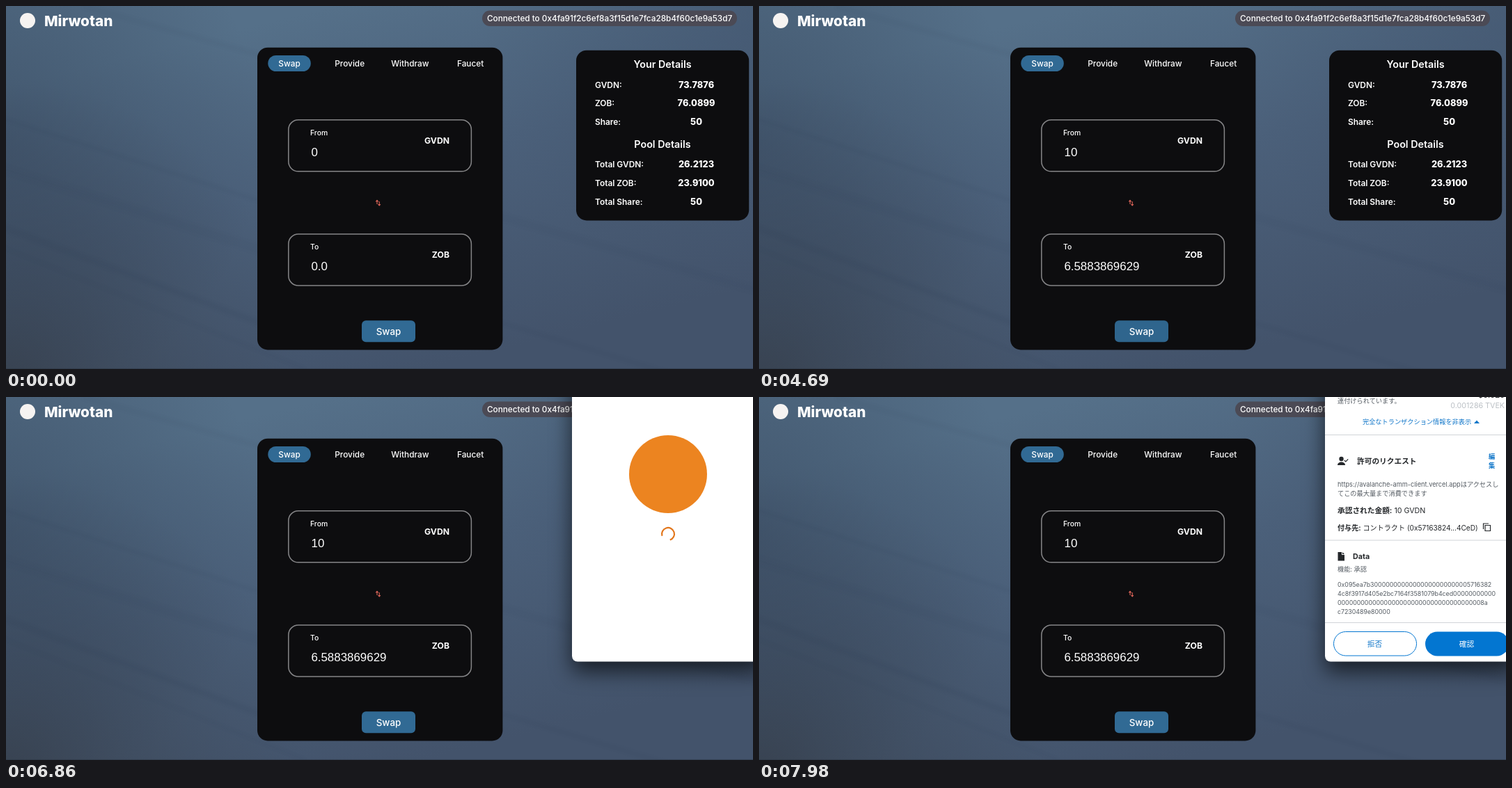
An HTML page for the animation above (8 s loop, 1073 by 522 pixels).

```html
<!DOCTYPE html>
<html lang="en">
<head>
<meta charset="utf-8">
<title>Token swap</title>
<style>
  html, body { margin: 0; width: 100%; height: 100%; overflow: hidden; background: #4a5e78; }
  svg { display: block; width: 100vw; height: 100vh; }
  text { font-family: Inter, "Noto Sans CJK JP", "Noto Sans CJK", sans-serif; fill: #fff; white-space: pre; }
  .m { text-anchor: middle; }
  .e { text-anchor: end; }
  .tab { font-size: 11.8px; font-weight: 500; }
  .label { font-size: 10.4px; font-weight: 500; }
  .token { font-size: 12.2px; font-weight: 700; }
  .num { font-family: "Liberation Sans", Arial, sans-serif; font-size: 16.9px; }
  .head { font-size: 14.3px; font-weight: 600; }
  .row { font-size: 11.9px; font-weight: 600; }
  .val { font-size: 12.8px; font-weight: 800; }
  .streaks path { fill: none; stroke: #24344c; filter: blur(2px); }
  #shadow { filter: drop-shadow(0 14px 15px rgba(0, 0, 0, .65)); }
  #page text { fill: #535a61; font-size: 10.7px; }
  #page .s { font-size: 9.2px; }
  #page .hex { font-size: 8.8px; }
  #page .b { font-weight: 700; fill: #24272a; }
  #page .k { fill: #24272a; }
  #page .link { fill: #1076c9; }
  #page .title { font-size: 18.4px; fill: #24272a; }
  .rule { stroke: #d0d4d8; stroke-width: 1; }
  .icon { fill: none; stroke: #24272a; stroke-width: 1.2; }
</style>
</head>
<body>
<svg viewBox="0 0 1073 522" preserveAspectRatio="none">
  <defs>
    <linearGradient id="sky" gradientUnits="userSpaceOnUse" x1="470" y1="0" x2="600" y2="522">
      <stop offset="0" stop-color="#557089"/>
      <stop offset=".45" stop-color="#4b607a"/>
      <stop offset="1" stop-color="#43536b"/>
    </linearGradient>
    <radialGradient id="dim" gradientUnits="userSpaceOnUse" cx="0" cy="540" r="430">
      <stop offset="0" stop-color="#353d48" stop-opacity=".8"/>
      <stop offset="1" stop-color="#3c4858" stop-opacity="0"/>
    </radialGradient>
    <radialGradient id="dimLeft" gradientUnits="userSpaceOnUse" cx="-20" cy="190" r="390">
      <stop offset="0" stop-color="#2f3d52" stop-opacity=".5"/>
      <stop offset="1" stop-color="#2f3d52" stop-opacity="0"/>
    </radialGradient>
    <radialGradient id="dimRight" gradientUnits="userSpaceOnUse" cx="1090" cy="0" r="420">
      <stop offset="0" stop-color="#3d4f68" stop-opacity=".45"/>
      <stop offset="1" stop-color="#3d4f68" stop-opacity="0"/>
    </radialGradient>
    <clipPath id="frame"><rect x="813" y="-94" width="276" height="474.5" rx="8"/></clipPath>
    <clipPath id="disc"><circle cx="900.5" cy="266.5" r="8.3"/></clipPath>
  </defs>

  <rect width="1073" height="522" fill="url(#sky)"/>
  <rect width="1073" height="522" fill="url(#dim)"/>
  <rect width="1073" height="522" fill="url(#dimLeft)"/>
  <rect width="1073" height="522" fill="url(#dimRight)"/>
  <g class="streaks">
    <path d="M-10 160L370 282" stroke-width="5" opacity=".06"/>
    <path d="M-10 232L370 352" stroke-width="14" opacity=".04"/>
    <path d="M-10 316L370 458" stroke-width="9" opacity=".08"/>
    <path d="M-10 345L430 522" stroke-width="4" opacity=".06"/>
    <path d="M110 0L370 72" stroke-width="8" opacity=".04"/>
    <path d="M700 300L1083 410" stroke-width="12" opacity=".04"/>
    <path d="M700 452L960 530" stroke-width="6" opacity=".07"/>
  </g>
  <path d="M0 521.5H1073" stroke="#2d3745" opacity=".6"/>

  <circle cx="31" cy="21" r="11" fill="#f6f3f1"/>
  <text x="55" y="29" font-size="20.8" font-weight="800">Mirwotan</text>
  <rect x="684" y="6.5" width="366" height="22.5" rx="11.2" fill="#4b4a55"/>
  <text x="691" y="22.2" font-size="11.75" font-weight="500">Connected to 0x4fa91f2c6ef8a3f15d1e7fca28b4f60c1e9a53d7</text>

  <rect x="361" y="59.7" width="352.4" height="434.7" rx="15" fill="#0d0d0f"/>
  <rect x="376.3" y="71" width="61.5" height="23" rx="11.5" fill="#316a94"/>
  <g id="tabs"></g>
  <g fill="none" stroke="#858587" stroke-width="1.5">
    <rect x="405.8" y="163.8" width="262.6" height="74" rx="14"/>
    <rect x="405.8" y="328" width="262.6" height="74" rx="14"/>
  </g>
  <text class="label" x="437" y="185.7">From</text>
  <text class="label" x="437" y="349.7">To</text>
  <text class="token e" x="637" y="198">GVDN</text>
  <text class="token e" x="637" y="362">ZOB</text>
  <text class="num" id="from" x="438.6" y="216"></text>
  <text class="num" id="to" x="438.4" y="380"></text>
  <g id="stepper">
    <rect x="540" y="200" width="11.5" height="20" fill="#4c4c4e"/>
    <path d="M543 207.6L545.7 204.4L548.4 207.6ZM543 212.8L545.7 216L548.4 212.8Z" fill="#f2f2f2"/>
  </g>
  <rect id="caret" y="201" width="1" height="18.5" fill="#fff"/>
  <path d="M533 285V279.5M531.3 281.3L533 279.3L534.7 281.3M536.2 281V286.7M534.5 285L536.2 287L537.9 285" fill="none" stroke="#df665a" stroke-width="1.1"/>
  <rect id="button" x="511" y="452.2" width="77" height="31" rx="6"/>
  <text class="m" x="549.5" y="473" font-size="13.4" font-weight="500">Swap</text>

  <rect x="819" y="63.7" width="248.2" height="244.7" rx="15" fill="#0d0d0f"/>
  <text class="head m" x="943" y="88.8">Your Details</text>
  <text class="head m" x="943" y="203.5">Pool Details</text>
  <g id="details"></g>

  <g id="popup">
    <rect id="shadow" x="813" y="-94" width="276" height="474.5" rx="8" fill="#fff"/>
    <g clip-path="url(#frame)">
      <g id="loading">
        <circle cx="951" cy="111" r="56" fill="#ec8420"/>
        <path id="ring" d="M951 188A9 9 0 1 1 942 197" fill="none" stroke="#e2761b" stroke-width="2.2"/>
      </g>
      <g id="page">
        <rect x="825.5" y="-50" width="252" height="120" rx="6" fill="#eaf2fb" stroke="#4b92cf"/>
        <text class="s k" x="863" y="9">ガス代の見積もりとカスタマイズが新しくなり</text>
        <text class="s k" x="863" y="22">ました。</text>
        <text class="s b link" x="863" y="41">設定で、改善されたガス代 UI をオンにしてくだ</text>
        <text class="s b link" x="863" y="54">さい</text>

        <rect x="861.5" y="95.5" width="178" height="38" rx="19" fill="#fff" stroke="#bbc0c5"/>
        <circle cx="883" cy="114" r="12" fill="#e2761b"/>
        <circle cx="901" cy="107" r="9.2" fill="#f2f3f4" stroke="#d6d9dc"/>
        <text class="m" x="901" y="111">A</text>
        <text x="914" y="111">avalanche-amm-</text>
        <text x="914" y="126">client.vercel.app</text>
        <text class="title m" x="950.5" y="170">GVDNへのアクセス権限を与</text>
        <text class="title m" x="950.5" y="195">えますか？</text>
        <text class="m" x="950" y="225">パーミッションを付与することで、次のコントラ</text>
        <text class="m" x="950" y="240">クトによる資金へのアクセスが許可されます</text>

        <rect x="881" y="256" width="139" height="21" rx="10.5" fill="#f2f3f4"/>
        <g clip-path="url(#disc)">
          <rect x="892" y="258" width="17" height="17" fill="#f39a2b"/>
          <path d="M900 257L910 257V268L899 265Z" fill="#2a86d8"/>
          <path d="M890 266L901 269L907 276H890Z" fill="#17496e"/>
        </g>
        <text x="914" y="270" style="font-size:10.3px">0x5716...4ced</text>
        <g class="icon">
          <path d="M991 265H995.5V269.5H991ZM989.3 267.5V263.2H993.6"/>
          <path d="M1006 263H1002.5V270H1009.5V268M1004.8 267.6C1005 265 1006.5 264.3 1009.5 264.3M1008 262L1010.6 264.3L1008 266.6"/>
        </g>
        <text class="link m" x="950.5" y="299.3" style="font-size:11.1px">アクセス許可の編集</text>
        <path class="rule" d="M813 327.5H1089"/>

        <path d="M831 359H837L843.5 365.3L837.8 371L831 364.5Z" fill="#24272a"/>
        <circle cx="833.6" cy="361.6" r="1.1" fill="#fff"/>
        <text class="b" x="856" y="368">トランザクション手数料</text>
        <text class="s b link" x="1048" y="361.3">編</text>
        <text class="s b link" x="1048" y="374.3">集</text>

        <g transform="translate(0 405)">
          <text class="s" x="831" y="-5">手数料はこのリクエストに関</text>
          <text class="s" x="831" y="8.5">連付けられています。</text>
          <text class="b e" x="1071" y="1">$0.026</text>
          <text class="e" x="1071" y="16" style="fill:#bbc0c5">0.001286 TVEK</text>
          <text class="s link" x="867" y="38.7">完全なトランザクション情報を非表示</text>
          <path d="M1027 38L1031 33.5L1035 38Z" fill="#1076c9"/>
          <path class="rule" d="M813 54.5H1089"/>

          <circle cx="836.5" cy="89" r="3.2" fill="#24272a"/>
          <path d="M831 98C831 92 842 92 842 98Z" fill="#24272a"/>
          <path class="icon" d="M840.8 91L842.8 93L846.2 89.3"/>
          <text class="b" x="859" y="96">許可のリクエスト</text>
          <text class="s b link" x="1048" y="89.3">編</text>
          <text class="s b link" x="1048" y="102.3">集</text>
          <text class="s" x="831" y="128.5">https://avalanche-amm-client.vercel.appはアクセスし</text>
          <text class="s" x="831" y="141.5">てこの最大量まで消費できます</text>
          <text class="k" x="831" y="167"><tspan class="b">承認された金額:</tspan> 10 GVDN</text>
          <text class="k" x="831" y="192" style="font-size:10.1px"><tspan class="b">付与先:</tspan> コントラクト (0x57163824...4CeD)</text>
          <path class="icon" d="M1043 184.5H1050.5V192.5H1043ZM1040.5 190V182H1048"/>
          <path class="rule" d="M813 206H1089"/>

          <path d="M831.5 223H837V227H841V235.5H831.5ZM838 223L841 226H838Z" fill="#24272a"/>
          <text class="b" x="853" y="233">Data</text>
          <text class="s" x="831" y="251">機能: 承認</text>
          <g id="hex"></g>
          <path class="rule" d="M813 324.5H1089"/>
          <rect x="825.5" y="337.5" width="119" height="34.5" rx="17.2" fill="#fff" stroke="#0376d1"/>
          <text class="link m" x="884.5" y="358.5">拒否</text>
          <rect x="957" y="337.5" width="120" height="35" rx="17.5" fill="#0376d1"/>
          <text class="m" x="1016.5" y="358.5" style="fill:#fff;font-weight:500">確認</text>
        </g>
      </g>
      <rect x="813" y="-94" width="276" height="22" fill="#46474c"/>
      <circle cx="824" cy="-83" r="4.6" fill="#ec6a5e"/>
      <circle cx="839.4" cy="-83" r="4.6" fill="#f4bf4f"/>
      <circle cx="854.8" cy="-83" r="4.6" fill="#61c454"/>
    </g>
  </g>
</svg>
<script>
  const LOOP = 8000, STEP = 70;
  const $ = id => document.getElementById(id);

  function addText(parent, cls, x, y, str) {
    const el = document.createElementNS("http://www.w3.org/2000/svg", "text");
    el.setAttribute("class", cls);
    el.setAttribute("x", x);
    el.setAttribute("y", y);
    el.textContent = str;
    $(parent).append(el);
  }

  ["Swap", "Provide", "Withdraw", "Faucet"].forEach((s, i) =>
    addText("tabs", "tab m", 407 + i * 86.7, 87.3, s));

  [
    ["GVDN:", "73.7876", 117.5], ["ZOB:", "76.0899", 144.3], ["Share:", "50", 171.2],
    ["Total GVDN:", "26.2123", 232.3], ["Total ZOB:", "23.9100", 259.2], ["Total Share:", "50", 286]
  ].forEach(([name, value, y]) => {
    addText("details", "row", 846, y, name);
    addText("details", "val m", 991.5, y, value);
  });

  const zeros = n => "0".repeat(n);
  [
    "0x095ea7b3" + zeros(24) + "5716382",
    "4c8f3917d405e2bc7164f3581079b4ced" + zeros(11),
    zeros(37) + "8a",
    "c7230489e80000"
  ].forEach((s, i) => addText("hex", "hex", 831, 273.3 + i * 12.8, s));

  // Each track: [start ms, value...]
  const HINT = "Enter amount";
  const tracks = {
    from: [[0, "0"], [1960, HINT], [2450, "1"], [2870, "10"]],
    to: [[0, "0.0"], [3010, "0.8761074338"], [3150, "6.5883869629"]],
    caret: [[0, 0], [1050, 448], [1540, 0], [2100, 439], [2450, 448],
      [2870, 457.3], [3430, 0], [3990, 457.3], [4480, 0]],
    stepper: [[0, 0], [910, 1], [4690, 0]],
    button: [[0, "#316a94"], [4200, "#2f658d"], [4270, "#2d6087"], [4480, "#2f658d"], [5180, "#316a94"]],
    popup: [[0, 0, 0], [5460, .53, .25], [5530, .584, .6], [5600, .8, .86], [5670, .94, .97], [5740, 1, 1]],
    page: [[0, 0], [7210, 1]],
    scroll: [[0, 0], [7700, 40], [7770, 145], [7840, 265], [7910, 360], [7980, 405]]
  };

  const row = (name, t) => tracks[name].findLast(r => r[0] <= t);
  const at = (name, t) => row(name, t)[1];
  const show = (id, on) => { $(id).style.display = on ? "" : "none"; };

  function draw(t) {
    const from = at("from", t);
    $("from").textContent = from;
    $("from").style.fill = from === HINT ? "#757575" : "#fff";
    $("to").textContent = at("to", t);

    const caret = at("caret", t);
    show("caret", caret);
    $("caret").setAttribute("x", caret);
    show("stepper", at("stepper", t));
    $("button").setAttribute("fill", at("button", t));

    const [, scale, alpha] = row("popup", t);
    show("popup", alpha);
    $("popup").setAttribute("opacity", alpha);
    $("popup").setAttribute("transform", `translate(951 143) scale(${scale}) translate(-951 -143)`);

    const loaded = at("page", t);
    show("loading", !loaded);
    show("page", loaded);
    $("ring").setAttribute("transform", `rotate(${(t - 6160) * .36} 951 197)`);
    $("page").setAttribute("transform", `translate(0 ${-at("scroll", t)})`);
  }

  const start = performance.now();
  function tick() {
    const t = (performance.now() - start) % LOOP;
    draw(Math.floor(t / STEP) * STEP);
    requestAnimationFrame(tick);
  }
  tick();
</script>
</body>
</html>
```
